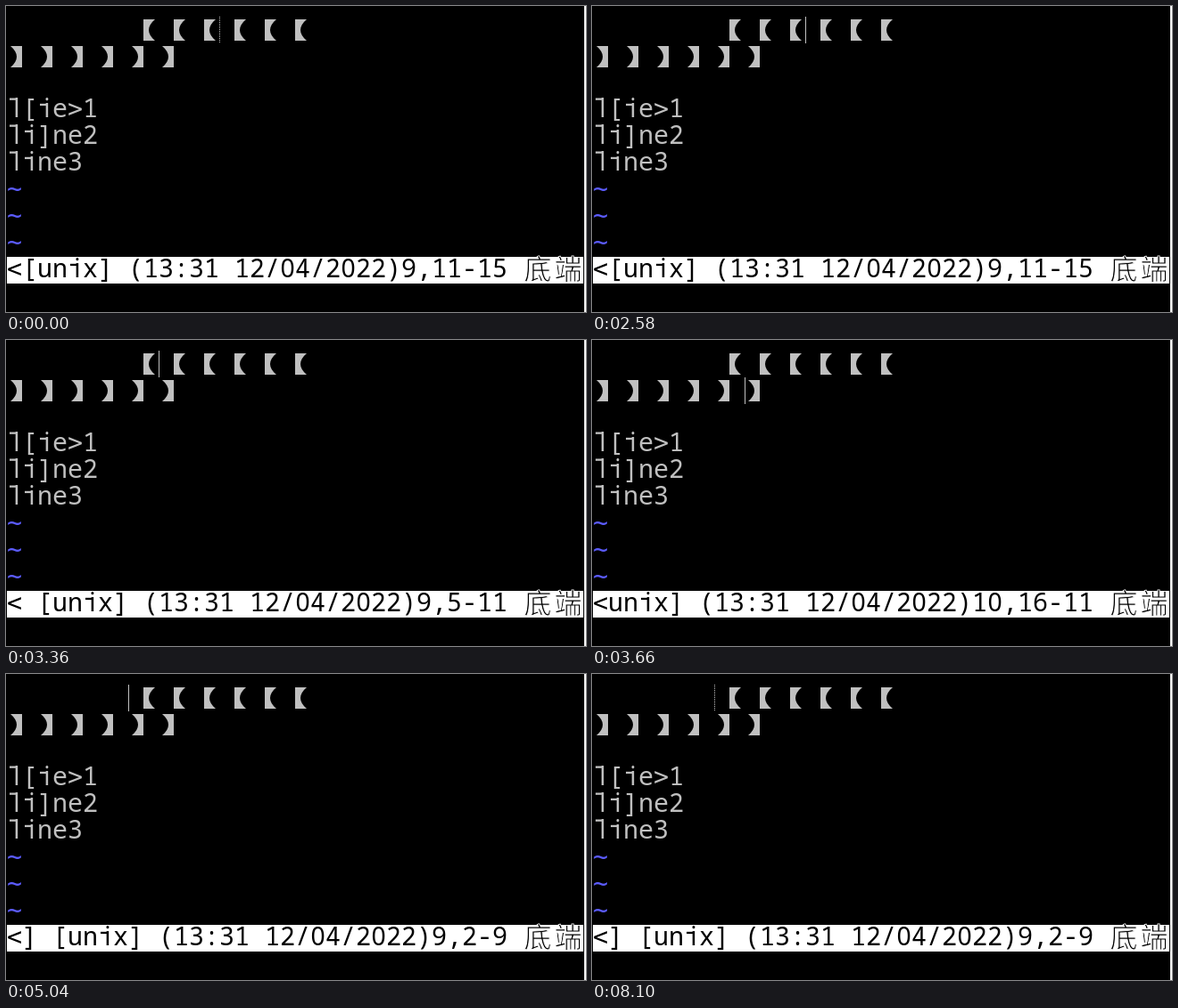
Write an HTML page with a canvas that moves like this. It is 650 px wide and 344 px high and loops after 8160 ms.

```html
<!DOCTYPE html>
<html lang="zh">
<head>
<meta charset="utf-8">
<style>
  html, body { margin: 0; width: 100%; height: 100%; overflow: hidden; background: #000; }
  canvas { display: block; }
</style>
</head>
<body>
<canvas width="650" height="344"></canvas>
<script>
const ctx = document.querySelector('canvas').getContext('2d');
const LOOP = 8160, CELL = 17, LINE = 30, LEFT = 1, TOP = 12;
const GRAY = '#c0c0c0', BLUE = '#5c5cff';
const MONO = '28.33px "Noto Sans Mono", monospace';
const SANS = '28.33px "Noto Sans", sans-serif';
const WIDE = '28.33px "DejaVu Sans Mono", monospace';
const CJK = '300 31px "Noto Sans CJK SC", "Noto Sans CJK", sans-serif';

// [start ms, buffer line, column, cursor look]
const STEPS = [
  [0, 9, 14, 'dotted'], [240, 9, 14, 'on'], [720, 9, 14, 'off'], [1140, 9, 14, 'on'],
  [2100, 9, 14, 'off'], [2580, 9, 14, 'on'],
  [2640, 9, 12, 'on'], [3120, 9, 12, 'off'],
  [3360, 9, 10, 'on'],
  [3660, 10, 10, 'on'], [4140, 10, 10, 'off'], [4380, 10, 10, 'on'], [4920, 10, 10, 'off'],
  [4980, 9, 10, 'on'],
  [5040, 9, 8, 'on'], [5520, 9, 8, 'off'], [6060, 9, 8, 'on'], [6540, 9, 8, 'off'],
  [7080, 9, 8, 'on'], [7560, 9, 8, 'off'], [8100, 9, 8, 'dotted']
];

const cellX = col => LEFT + col * CELL;
const rowY = row => TOP + row * LINE;

function fontFor(char) {
  if ('li0'.includes(char)) return SANS;
  return '~<>'.includes(char) ? WIDE : MONO;
}

function drawChar(char, col, row) {
  const x = cellX(col), baseline = rowY(row) + 23;
  const narrow = char === 'l' || char === 'i';
  ctx.font = fontFor(char);
  ctx.fillText(char, x + (narrow ? 11 : CELL / 2), baseline);
  // The terminal face has a flag at the left of l and i.
  if (narrow) ctx.fillRect(x + 3, baseline - (char === 'l' ? 21.5 : 15.2), 8, 2.3);
}

function drawText(text, row, color) {
  ctx.fillStyle = color;
  ctx.textAlign = 'center';
  ctx.textBaseline = 'alphabetic';
  [...text].forEach((char, col) => drawChar(char, col, row));
}

function drawBracket(col, row, opening) {
  ctx.save();
  ctx.translate(cellX(col) + CELL, rowY(row) + 3);
  if (!opening) ctx.scale(-1, 1);
  ctx.fillStyle = GRAY;
  ctx.beginPath();
  ctx.moveTo(0, 0);
  ctx.lineTo(13, 0);
  ctx.quadraticCurveTo(-1, 12, 13, 24);
  ctx.lineTo(0, 24);
  ctx.fill();
  ctx.restore();
}

// A white outline thins the strokes.
function drawThinGlyph(char, x, y) {
  ctx.font = CJK;
  ctx.textBaseline = 'middle';
  ctx.fillText(char, x, y);
  ctx.strokeStyle = '#fff';
  ctx.lineWidth = 0.9;
  ctx.strokeText(char, x, y);
}

function drawStatus(line, col) {
  ctx.fillStyle = '#fff';
  ctx.fillRect(LEFT, rowY(9), 38 * CELL, LINE);
  const byte = line === 9 ? 2 + 3 * (col - 8) / 2 : 1 + 3 * col / 2;
  const full = `] [unix] (13:31 12/04/2022)${line},${byte}-${col + 1}`;
  drawText('<' + full.slice(-32), 9, '#000');
  drawThinGlyph('底', cellX(35), rowY(9) + 13.5);
  drawThinGlyph('端', cellX(37), rowY(9) + 13.5);
}

function drawCursor(line, col, look) {
  if (look === 'off') return;
  ctx.fillStyle = GRAY;
  const x = cellX(col), y = rowY(line - 9);
  if (look === 'on') ctx.fillRect(x, y, 1, LINE);
  else for (let dy = 0; dy < LINE; dy += 2) ctx.fillRect(x, y + dy, 1, 1);
}

function draw(time) {
  const [, line, col, look] = STEPS.findLast(step => step[0] <= time);
  ctx.fillStyle = '#000';
  ctx.fillRect(0, 0, 650, 344);
  ctx.fillStyle = '#fff';
  ctx.fillRect(648, 0, 2, 344);
  for (let i = 0; i < 6; i++) {
    drawBracket(8 + 2 * i, 0, true);
    drawBracket(2 * i, 1, false);
  }
  ['l[ie>1', 'li]ne2', 'line3'].forEach((text, i) => drawText(text, 3 + i, GRAY));
  for (let row = 6; row < 9; row++) drawText('~', row, BLUE);
  drawStatus(line, col);
  drawCursor(line, col, look);
}

function tick() {
  draw(performance.now() % LOOP);
  requestAnimationFrame(tick);
}
tick();
</script>
</body>
</html>
```
